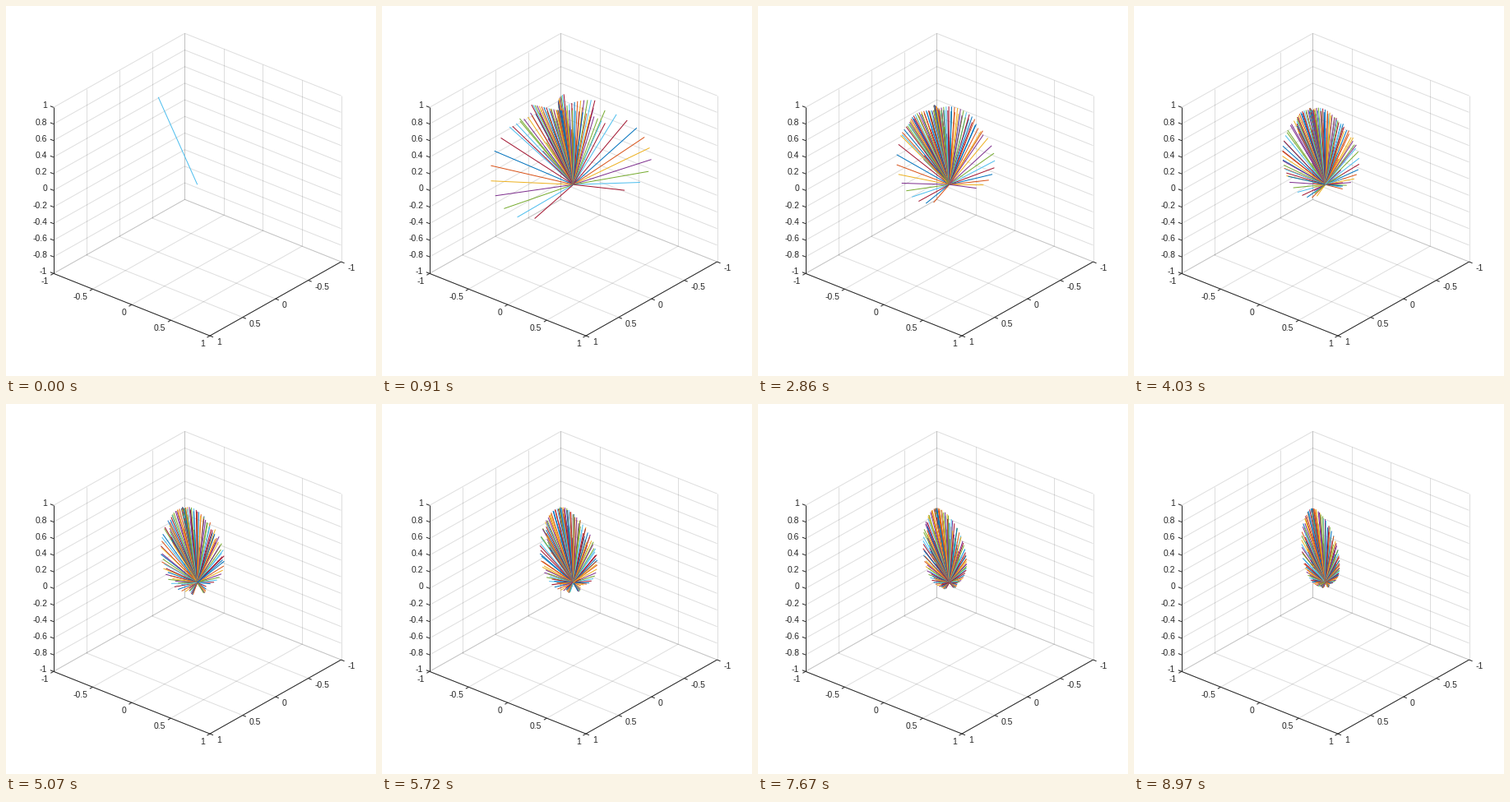
A matplotlib script that plays this animation: 450 by 450 pixels, repeating every 9.1 s.

```python
import numpy as np
import matplotlib
import matplotlib.pyplot as plt
from matplotlib.animation import FuncAnimation
from matplotlib.collections import LineCollection

matplotlib.rcParams["toolbar"] = "None"

SIZE, DPI = 450, 100
FRAMES, STEP = 70, 130
PX = 72 / DPI
INK = (0.15, 0.15, 0.15)
COLORS = ["#0072BD", "#D95319", "#EDB120", "#7E2F8E",
          "#77AC30", "#4DBEEE", "#A2142F"]

# Screen vectors of the three data axes
CENTER = np.array([232.69, 217.2])
BASIS = np.array([[-79.8, 45.0], [95.06, 37.9], [0.0, -101.0]])

# Lobe frame: main direction and two directions across it
AXIS = np.array([0.2, 0.0, 0.98])
SIDE = np.array([0.0, 1.0, 0.0])
FRONT = np.array([0.98, 0.0, -0.2])

# Azimuths (start, end) of the arcs that the ray tips follow
WIDE = [(172, 95), (-54, -38)]
LATE = [(20, 25), (60, 70), (155, 145)]
NARROW = [(170, 190), (215, 235), (260, 280), (310, 330)]


def project(points):
    return CENTER + np.asarray(points, float) @ BASIS


def arc(azimuths, spread, count, k, rng):
    """Ray tips along one arc of the lobe, from its top downwards."""
    u = (np.arange(count) + rng.uniform(0.2, 0.8)) / count
    theta = np.radians(spread) * u ** 1.3
    start, end = azimuths
    phi = np.radians(start + (end - start) * u + rng.uniform(-8, 8))
    r = 1 / (1 + k * (1 - np.cos(theta)) ** 0.8)
    r *= 1 - 0.5 * (theta / 2) ** 6
    across = np.outer(np.cos(phi), SIDE) + np.outer(np.sin(phi), FRONT)
    return (r * np.cos(theta))[:, None] * AXIS + (r * np.sin(theta))[:, None] * across


def lobe(n):
    rng = np.random.default_rng(n)
    k = 0.00765 * n ** 1.67
    count = 14 + n // 8
    late = np.clip(32 + 4 * (n - 22), 32, 108)
    narrow = 24 + 0.5 * n
    arcs = [(a, 112) for a in WIDE]
    arcs += [(a, late) for a in LATE]
    arcs += [(a, narrow) for a in NARROW]
    return np.vstack([arc(a, spread, count, k, rng) for a, spread in arcs])


fig = plt.figure(figsize=(SIZE / DPI, SIZE / DPI), dpi=DPI, facecolor="white")
ax = fig.add_axes([0, 0, 1, 1])
ax.set_xlim(0, SIZE)
ax.set_ylim(SIZE, 0)
ax.axis("off")


def draw_grid():
    half = np.linspace(-1, 1, 5)
    fifth = np.linspace(-1, 1, 11)
    segs = []
    for v in half:
        segs += [[(v, -1, -1), (v, 1, -1)], [(-1, v, -1), (1, v, -1)],
                 [(v, -1, -1), (v, -1, 1)], [(-1, v, -1), (-1, v, 1)]]
    for v in fifth:
        segs += [[(-1, -1, v), (1, -1, v)], [(-1, -1, v), (-1, 1, v)]]
    ax.add_collection(LineCollection([project(s) for s in segs],
                                     colors=[INK + (0.15,)], linewidths=PX))


def draw_axis(start, end, values, tick, offset, align):
    a, b = project([start, end])
    segs = [[a, b]]
    for v in values:
        p = a + (b - a) * (v + 1) / 2
        segs.append([p, p + tick])
        x, y = p + offset
        ax.text(x, y, f"{v:g}", ha=align, va="center_baseline", color=INK,
                fontsize=10.4 * PX, family="Liberation Sans")
    ax.add_collection(LineCollection(segs, colors=[INK], linewidths=PX))


draw_grid()
halves = [-1, -0.5, 0, 0.5, 1]
draw_axis((1, -1, -1), (1, 1, -1), halves, (-3.5, 2), (-6.2, 8.8), "right")
draw_axis((-1, 1, -1), (1, 1, -1), halves, (4, 1.6), (8.2, 7), "left")
draw_axis((1, -1, -1), (1, -1, 1), [i / 5 for i in range(-5, 6)],
          (-4, -1.6), (-7.6, -2.8), "right")

rays = LineCollection([], linewidths=PX, zorder=5)
ax.add_collection(rays)


def update(n):
    if n == 0:
        tips, colors = [(0.0, -0.5, 0.866)], [COLORS[5]]
    else:
        tips = lobe(n)
        colors = [COLORS[i % 7] for i in range(len(tips))]
    rays.set_segments([[CENTER, p] for p in project(tips)])
    rays.set_color(colors)
    return [rays]


anim = FuncAnimation(fig, update, frames=FRAMES, interval=STEP,
                     repeat=True, repeat_delay=0, blit=False)
plt.show()
```
